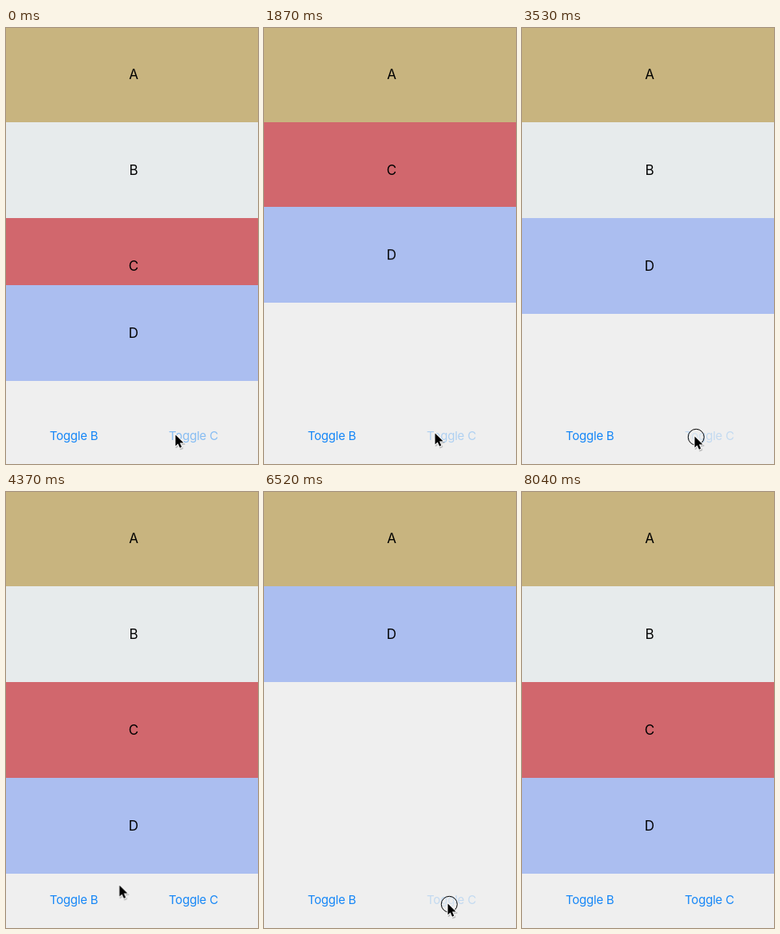
Animation of 316 by 546 pixels, one loop 8700 ms. Source, as an HTML page:

```html
<!DOCTYPE html>
<html lang="en">
<head>
<meta charset="utf-8">
<title>Toggle rows</title>
<style>
  html, body { margin: 0; width: 100%; height: 100%; overflow: hidden; background: #efefef; }
  body { position: relative; font: 17px/120px Inter, Roboto, sans-serif; color: #000; }
  .row, .group, .button, #cursor { position: absolute; }
  .row { left: 0; width: 320px; height: 120px; text-align: center; }
  .group { left: 0; top: 0; }
  #a { top: -2px; background: #c8b47f; }
  #b { top: 118px; background: #e7ebec; }
  #c { top: 238px; background: #d1676d; }
  #d { top: 358px; background: #abbef0; }
  .button { top: 496px; width: 100px; font-size: 15px; line-height: 30px; letter-spacing: -.2px; text-align: center; color: #1486f7; }
  #toggleB { left: 35px; }
  #toggleC { left: 185px; }
  #cursor { left: 0; top: 0; overflow: visible; }
</style>
</head>
<body>
  <div class="row" id="a">A</div>
  <div class="row" id="b">B</div>
  <div class="group" id="belowB">
    <div class="row" id="c">C</div>
    <div class="group" id="belowC">
      <div class="row" id="d">D</div>
    </div>
  </div>
  <div class="button" id="toggleB">Toggle B</div>
  <div class="button" id="toggleC">Toggle C</div>
  <svg id="cursor" width="24" height="24">
    <circle id="ring" cx="2.3" cy="1.3" r="10" fill="#efefef" fill-opacity=".35" stroke="#000"/>
    <g stroke-linejoin="round">
      <path d="M1.5 2v14l3.2-3 2.3 5.3 2.3-1-2.3-5.2h4.6z" fill="#000" opacity=".2" stroke="#000" stroke-width="2"/>
      <path d="M.5.5v14l3.2-3L6 16.8l2.3-1L6 10.6h4.6z" fill="#000" stroke="#fff" stroke-width="2" paint-order="stroke"/>
    </g>
  </svg>
<script>
  const LOOP = 8700, SLIDE = 300, EASE = 'cubic-bezier(.42, 0, .58, 1)';
  const byId = id => document.getElementById(id);
  const shift = (x, y) => `translate(${x}px, ${y}px)`;

  // steps: [ms, value, easing to the next step]
  function track(id, prop, steps) {
    const last = steps[steps.length - 1];
    const frames = [...steps, [LOOP, last[1]]].map(([ms, value, easing = 'linear']) =>
      ({ offset: ms / LOOP, [prop]: value, easing }));
    const anim = byId(id).animate(frames, { duration: LOOP, iterations: Infinity });
    anim.startTime = 0;
  }

  // [press, release]
  const taps = {
    B: [[1100, 1181], [2700, 2780], [4680, 4760], [7230, 7302]],
    C: [[20, 190], [1720, 1800], [3460, 3540], [5585, 5662], [6515, 6600]]
  };

  function slide(id, steps, isOpen, list) {
    for (const [, up] of list) {
      steps.push([up, shift(0, isOpen ? 0 : -120), EASE]);
      isOpen = !isOpen;
      steps.push([up + SLIDE, shift(0, isOpen ? 0 : -120)]);
    }
    track(id, 'transform', steps);
  }

  function dim(id, steps, list) {
    let rest = steps[0][1];
    for (const [down, up] of list) {
      steps.push([down, rest], [down, .2], [up, .2, EASE], [up + SLIDE, 1]);
      rest = 1;
    }
    track(id, 'opacity', steps);
  }

  slide('belowB', [[0, shift(0, 0)]], true, taps.B);
  // The loop opens with row C already closing.
  slide('belowC', [[0, shift(0, -36), 'cubic-bezier(.31, .42, .57, 1)'], [186, shift(0, -120)]], false, taps.C);
  dim('toggleB', [[0, 1]], taps.B);
  dim('toggleC', [[0, .48]], taps.C);

  const presses = [...taps.B, ...taps.C].sort((p, q) => p[0] - q[0]);
  presses[0] = [0, 190];
  track('ring', 'opacity', [[0, 0], ...presses.flatMap(([down, up]) =>
    [[down, 0], [down, 1], [up, 1], [up, 0]])]);

  track('cursor', 'transform', [
    [0, 212, 509], [480, 212, 509, EASE],
    [1060, 96, 506], [1290, 96, 506, EASE],
    [1700, 214, 507], [1940, 214, 507, EASE],
    [2560, 98, 509], [2880, 98, 509, EASE],
    [3430, 216, 511], [3830, 216, 511, 'ease-in'],
    [4370, 142, 492, 'ease-out'],
    [4650, 100, 511], [4930, 100, 511, 'ease-in'],
    [5330, 205, 513, 'ease-out'],
    [5440, 230, 515], [6780, 230, 515, EASE],
    [7200, 108, 510], [7840, 108, 510, 'ease-in'],
    [8040, 180, 550]
  ].map(([ms, x, y, easing]) => [ms, shift(x, y), easing]));
</script>
</body>
</html>
```
